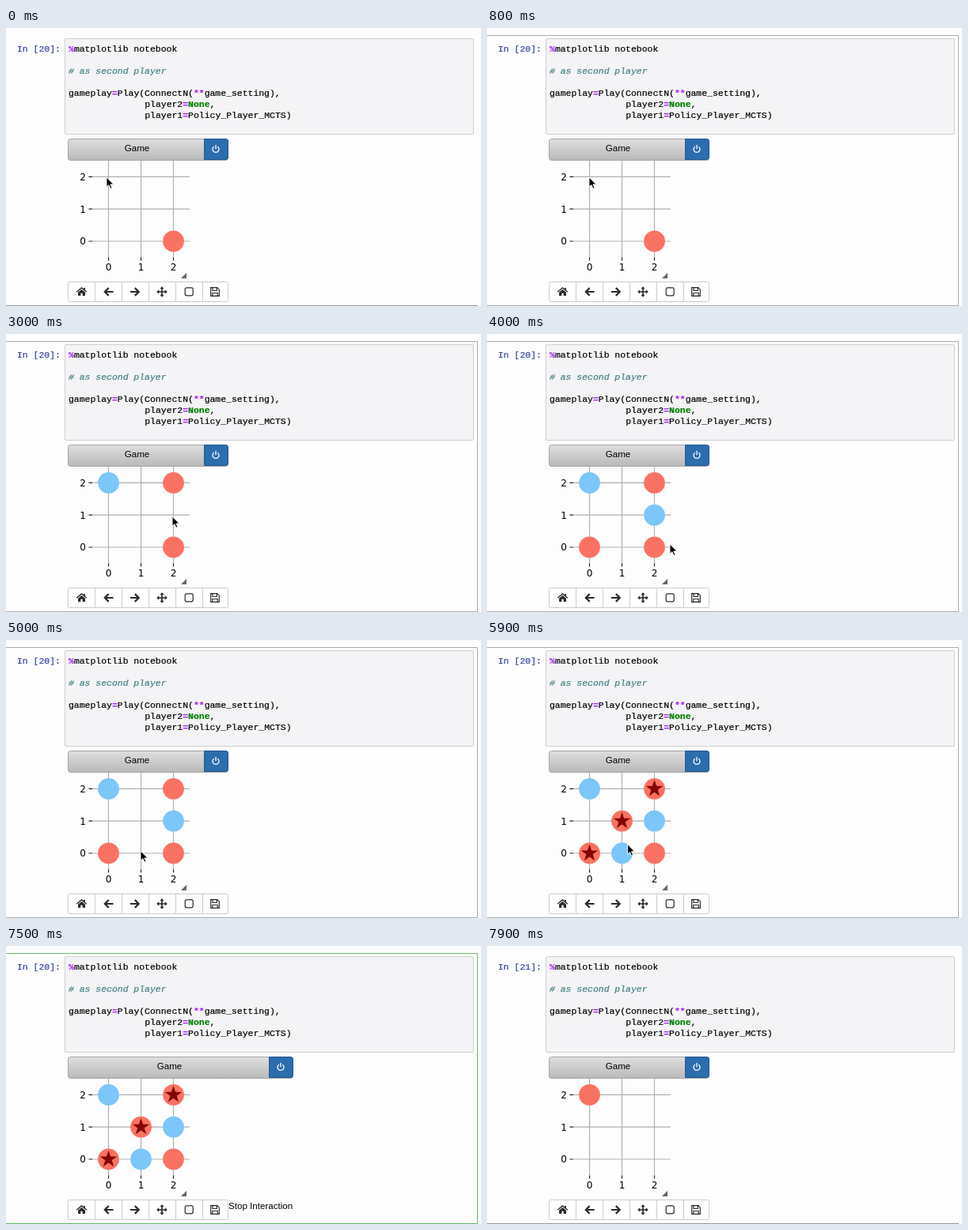
These frames come from a looping animation (600 by 352 pixels, 8 s). An HTML page:

```html
<!DOCTYPE html>
<html lang="en">
<head>
<meta charset="utf-8">
<title>Board game in a notebook</title>
<style>
  html, body { margin: 0; width: 100%; height: 100%; overflow: hidden; background: #fdfdfe; }
  svg { display: block; width: 100vw; height: 100vh; }
  .code { font: 11.45px "Liberation Mono", "Courier New", monospace; white-space: pre; stroke: #000; stroke-width: .2px; }
  .code .op { fill: #a2f; stroke: #a2f; font-weight: bold; }
  .code .kw { fill: #008000; stroke: #008000; font-weight: bold; }
  .code .note { fill: #408080; stroke: #408080; font-style: italic; }
  .code.prompt { fill: #303f9f; stroke: #303f9f; }
  .label { font: 11.6px "Liberation Sans", Arial, sans-serif; }
  .tick { font: 12px "DejaVu Sans", sans-serif; }
  .icon { fill: none; stroke: #2b2b2b; stroke-width: 1.4; }
  .solid { fill: #2b2b2b; stroke: none; }
</style>
</head>
<body>
<svg viewBox="0 0 600 352">
  <defs>
    <linearGradient id="bar" x2="0" y2="1">
      <stop stop-color="#dedede"/><stop offset="1" stop-color="#b9b9b9"/>
    </linearGradient>
  </defs>

  <path id="frame" fill="none"/>
  <rect x="74.5" y="13.5" width="516" height="121" rx="1.5" fill="#f4f3f6" stroke="#cfcfcf"/>
  <text id="prompt" class="code prompt" x="14" y="30"></text>
  <g class="code">
    <text x="79" y="30"><tspan class="op">%</tspan>matplotlib notebook</text>
    <text x="79" y="58" class="note">
      <tspan class="note"># as second player</tspan></text>
    <text x="79" y="86">gameplay<tspan class="op">=</tspan>Play(ConnectN(<tspan class="op">**</tspan>game_setting),</text>
    <text x="175.2" y="100">player2<tspan class="op">=</tspan><tspan class="kw">None</tspan>,</text>
    <text x="175.2" y="114">player1<tspan class="op">=</tspan>Policy_Player_MCTS)</text>
  </g>
  <path id="caret" d="M300 102.5v14" stroke="#000"/>

  <g id="output">
    <rect id="header" x="78.5" y="140.5" height="27" rx="3" fill="url(#bar)" stroke="#a5a5a5"/>
    <text id="title" class="label" y="156" font-weight="bold" text-anchor="middle">Game</text>
    <g id="power">
      <path d="M.5 .5H27.5Q30.500 .5 30.500 3.500V23.500Q30.500 26.500 27.500 26.500H.5Z" fill="#2b6dad" stroke="#24598f"/>
      <path d="M12.700 10.200A4 4 0 1 0 17.300 10.200M15 8v5.200" fill="none" stroke="#fff" stroke-width="1.3"/>
    </g>
    <g id="axes"></g>
    <g id="pieces"></g>
    <path d="M228 310v7h-7z" fill="#666"/>

    <rect x="78.500" y="321.500" width="202" height="25" rx="2" fill="#fff" stroke="#ccc"/>
    <path d="M112.500 322v24m34-24v24m34-24v24m34-24v24m34-24v24" stroke="#ccc"/>
    <g class="icon">
      <g transform="translate(95.500 334)">
        <path class="solid" d="M-4.500 .8L0-3L4.500 .8V5H1.200V1.800H-1.200V5H-4.500ZM2.700-5H4.500V-1.500L2.700-3Z"/>
        <path d="M-6.300 .2L0-5L6.300 .2"/>
      </g>
      <path id="left" d="M6 0H-4M.2-4.900L-4.700 0L.2 4.900" stroke-width="2.200" transform="translate(129.500 334)"/>
      <path d="M-6 0H4M-.2-4.900L4.700 0L-.2 4.900" stroke-width="2.200" transform="translate(163 334)"/>
      <g transform="translate(197 334)">
        <path d="M-5 0H5M0-5V5" stroke-width="1.700"/>
        <path class="solid" d="M0-6.800L2.700-3.800H-2.700ZM0 6.800L2.700 3.800H-2.700ZM-6.800 0L-3.800-2.700V2.700ZM6.800 0L3.800-2.700V2.700Z"/>
      </g>
      <rect x="226.200" y="328.800" width="10" height="10" rx="2" stroke-width="1.200"/>
      <path d="M-5.300-5.300H2.800L5.300-2.800V5.300H-5.300ZM-3-5V-1.500H2.300V-5M-3.200 5V1.500H3.200V5" stroke-width="1.200" transform="translate(264 334)"/>
    </g>
    <text id="tip" class="label" x="281" y="333">Stop Interaction</text>
  </g>
  <path id="mouse" d="M0 0V12.300L2.900 9.700L4.900 14.300L6.900 13.400L4.900 9H8.800Z" stroke="#fff" stroke-width=".9"/>
</svg>

<script>
const $ = id => document.getElementById(id);
const LOOP = 8000, RED = '#fa7264', BLUE = '#7cc6f9';
const px = col => 129.5 + 41 * col;
const py = row => 270 - 40.8 * row;

// Pieces: column, row, colour, time shown
const moves = [
  [2, 0, RED, 0], [0, 2, BLUE, 900], [2, 2, RED, 1000], [2, 1, BLUE, 3200],
  [0, 0, RED, 3300], [1, 0, BLUE, 5100], [1, 1, RED, 5200]
];
const WIN = 5200, HOVER = 6500, EDIT = 6700, RUN = 7600;

// Pointer: time, x, y
const path = [
  [0, 127, 189], [300, 122, 189], [600, 129, 189], [2200, 129, 189],
  [3000, 210, 231], [3800, 210, 231], [3900, 243, 266], [4000, 231, 266],
  [4300, 231, 266], [5000, 170, 267], [5800, 170, 267], [6400, 272, 157],
  [6500, 272, 157], [6700, 300, 109]
];

function pointer(t) {
  const i = path.findIndex(p => p[0] > t);
  if (i < 0) return path.at(-1).slice(1);
  const [t0, x0, y0] = path[i - 1], [t1, x1, y1] = path[i];
  const u = (t - t0) / (t1 - t0), k = u * u * (3 - 2 * u);
  return [x0 + (x1 - x0) * k, y0 + (y1 - y0) * k];
}

const disc = (col, row, fill) =>
  `<circle cx="${px(col)}" cy="${py(row)}" r="13.4" fill="${fill}"/>`;

function star(col, row) {
  const points = Array.from({ length: 10 }, (_, i) => {
    const r = i % 2 ? 4.4 : 11.3, a = i * Math.PI / 5;
    return [px(col) + r * Math.sin(a), py(row) - r * Math.cos(a)];
  });
  return `<polygon points="${points}" fill="#850404"/>`;
}

$('axes').innerHTML = [0, 1, 2].map(n => `
  <path d="M${px(n)} 168V290.5M109 ${py(n)}H232" stroke="#b0b0b0" stroke-width="1.2"/>
  <path d="M${px(n)} 290.5v4M104.500 ${py(n)}h4.500" stroke="#222" stroke-width="1.2"/>
  <text class="tick" x="${px(n)}" y="307" text-anchor="middle">${n}</text>
  <text class="tick" x="101" y="${py(n) + 4.4}" text-anchor="end">${n}</text>`).join('');

const show = (id, on) => $(id).setAttribute('visibility', on ? 'visible' : 'hidden');

function board(t) {
  if (t >= RUN) return t >= RUN + 200 ? disc(0, 2, RED) : '';
  const discs = moves.filter(m => t >= m[3]).map(m => disc(...m));
  const stars = t >= WIN ? [0, 1, 2].map(n => star(n, n)) : [];
  return [...discs, ...stars].join('');
}

let last = -1;
function draw(now) {
  const t = Math.floor(now % LOOP / 100) * 100;
  if (t !== last) {
    last = t;
    const rerun = t >= RUN, editing = t >= EDIT && !rerun;
    const wide = t >= HOVER && !rerun ? 82 : 0;
    const selected = t >= 800 && !rerun;

    $('prompt').textContent = `In [${!rerun ? 20 : t < RUN + 100 ? '*' : 21}]:`;
    $('frame').setAttribute('d', selected ? 'M0 9.5H595.5V351.500H0' : 'M0 351.5H596');
    $('frame').setAttribute('stroke', editing ? '#66bb6a' : selected ? '#ababab' : '#999');
    $('header').setAttribute('width', 202 + wide);
    $('title').setAttribute('x', 165.5 + wide / 2);
    $('power').setAttribute('transform', `translate(${250 + wide} 140)`);
    $('pieces').innerHTML = board(t);
    $('mouse').setAttribute('transform', `translate(${pointer(t)})`);
    show('output', t < RUN || t >= RUN + 100);
    show('tip', wide && !rerun);
    show('caret', t >= EDIT && t < 7200);
    show('mouse', t < EDIT);
  }
  requestAnimationFrame(draw);
}

// Keep the comment line flush with the code
const note = document.querySelector('text.note');
note.textContent = note.textContent.trim();

draw(0);
</script>
</body>
</html>
```
